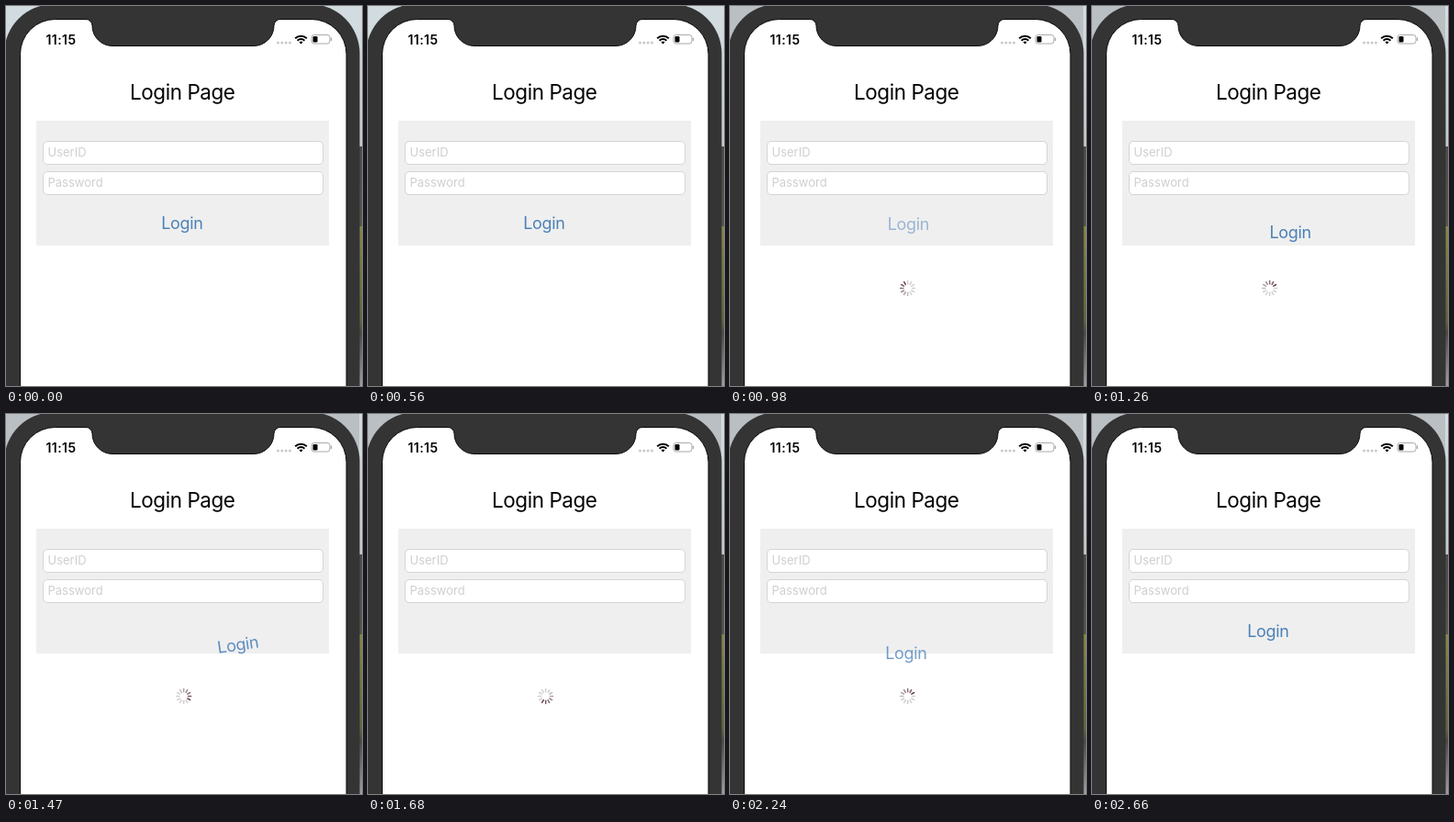
These frames come from a looping animation (388 px wide and 414 px high, 3360 ms). An HTML page:

```html
<!DOCTYPE html>
<html lang="en">
<head>
<meta charset="utf-8">
<title>Login Page</title>
<style>
  html, body { margin: 0; width: 100%; height: 100%; overflow: hidden; background: #333; }
  svg { display: block; width: 388px; height: 414px; font-family: Inter, Roboto, sans-serif; }
  .field { fill: #fff; stroke: #d5d5d5; }
  .hint { fill: #cfcfd1; font-size: 13px; }
  .heading { font-size: 22.5px; letter-spacing: -.02em; }
  .clock { font-size: 14px; font-weight: 600; letter-spacing: .03em; }
  #login { fill: #4a80b8; font-size: 18px; letter-spacing: -.02em; }
</style>
</head>
<body>
<svg viewBox="0 0 388 414">
  <defs>
    <linearGradient id="side" x2="0" y2="1">
      <stop offset="0" stop-color="#d5dcdf"/>
      <stop offset=".37" stop-color="#c6cacb"/>
      <stop offset=".37" stop-color="#4b4b4a"/>
      <stop offset=".58" stop-color="#555550"/>
      <stop offset=".58" stop-color="#85864f"/>
      <stop offset=".83" stop-color="#626440"/>
      <stop offset=".86" stop-color="#4c4a48"/>
      <stop offset="1" stop-color="#a09ea2"/>
    </linearGradient>
  </defs>

  <!-- desk and phone -->
  <rect width="388" height="414" fill="url(#side)"/>
  <rect id="desk" width="385" height="60"/>
  <rect x="-2" y="-2" width="387.5" height="500" rx="54" fill="#343434"/>
  <path d="M15.5 425V52.5a38 38 0 0 1 38-38H87a7 7 0 0 1 7 7a22 22 0 0 0 22 22H270a22 22 0 0 0 22-22a7 7 0 0 1 7-7H333a38 38 0 0 1 38 38V425Z"
        fill="#fff" stroke="#0c0c0c"/>

  <!-- status bar -->
  <text class="clock" x="43.5" y="42">11:15</text>
  <path d="M296.5 40h13" stroke="#c9c9c9" stroke-width="3" stroke-linecap="round" stroke-dasharray="0 4.3"/>
  <g fill="none" stroke="#000" stroke-width="2">
    <path d="M315.2 35.2a9 9 0 0 1 12.6 0M317.6 37.7a5.6 5.6 0 0 1 7.8 0"/>
    <path d="M321.5 41.5l-2-2a2.8 2.8 0 0 1 4 0z" fill="#000" stroke="none"/>
  </g>
  <rect x="333" y="31.5" width="20" height="9.5" rx="2.8" fill="none" stroke="#aaa"/>
  <rect x="334.5" y="33" width="5" height="6.5" rx="1.2"/>
  <path d="M354.5 34.5v3.5" stroke="#aaa" stroke-width="1.3"/>

  <!-- form -->
  <text class="heading" x="135" y="101.5">Login Page</text>
  <rect x="33" y="125" width="319" height="136" fill="#efefef"/>
  <rect class="field" x="40.5" y="147.5" width="305" height="25" rx="4.5"/>
  <rect class="field" x="40.5" y="180.5" width="305" height="25" rx="4.5"/>
  <text class="hint" x="45.5" y="164">UserID</text>
  <text class="hint" x="45.5" y="197">Password</text>
  <text id="login" x="169.3" y="243">Login</text>
  <g id="spinner" stroke-width="1.5" stroke-linecap="round"></g>
</svg>
<script>
const LOOP = 3360, TICK = 70;
const PRESS = 700, RELEASE = 840, START = 845, LENGTH = 1715, DONE = 2520;
const login = document.getElementById('login');
const spinner = document.getElementById('spinner');
const desk = document.getElementById('desk');

const clamp = v => Math.min(1, Math.max(0, v));
const span = (v, from, to) => clamp((v - from) / (to - from));

// cubic-bezier(.42, 0, .58, 1)
function easeInOut(x) {
  let lo = 0, hi = 1;
  for (let i = 0; i < 24; i++) {
    const s = (lo + hi) / 2, r = 1 - s;
    if (1.26 * r * r * s + 1.74 * r * s * s + s * s * s < x) lo = s; else hi = s;
  }
  return lo * lo * (3 - 2 * lo);
}

for (let i = 0; i < 12; i++) {
  const spoke = document.createElementNS('http://www.w3.org/2000/svg', 'path');
  spoke.setAttribute('d', 'M0-4.8V-8');
  spoke.setAttribute('transform', `translate(193.7 307.5) rotate(${i * 30})`);
  spinner.append(spoke);
}

function drawLogin(t) {
  const u = easeInOut(span(t, START, START + LENGTH));
  let x = 0, y = 0, turn = 0, alpha = 1;
  if (u < .5) {
    const dip = span(u, 0, .25), climb = span(u, .25, .5);
    x = 50 * dip + 100 * climb;
    y = 20 * dip - 50 * climb;
    turn = -22.5 * span(u, .15, .5);
    alpha = 1 - span(u, .25, .47);
  } else {
    const rise = span(u, .7, 1);
    y = 100 * (1 - rise);
    alpha = rise;
  }
  if (t >= PRESS) alpha *= .2 + .8 * span(t, RELEASE, 1190);
  login.setAttribute('transform', `translate(${x} ${y}) rotate(${turn} 192 236)`);
  login.setAttribute('opacity', alpha);
}

function drawSpinner(t) {
  const on = t >= RELEASE && t < DONE;
  spinner.style.display = on ? '' : 'none';
  const head = Math.floor((t - 60) * 12 / 1000);
  [...spinner.children].forEach((spoke, i) => {
    const age = ((head - i) % 12 + 12) % 12;
    const k = Math.min(1, age / 6);
    const mix = (a, b) => Math.round(a + (b - a) * k);
    spoke.setAttribute('stroke', `rgb(${mix(105, 210)},${mix(66, 207)},${mix(78, 208)})`);
  });
}

let begin;
function frame(now) {
  begin ??= now;
  const t = Math.floor((now - begin) % LOOP / TICK) * TICK;
  desk.setAttribute('fill', t < PRESS ? '#d1dbe0' : '#b9bfc3');
  drawLogin(t);
  drawSpinner(t);
  requestAnimationFrame(frame);
}
requestAnimationFrame(frame);
</script>
</body>
</html>
```
